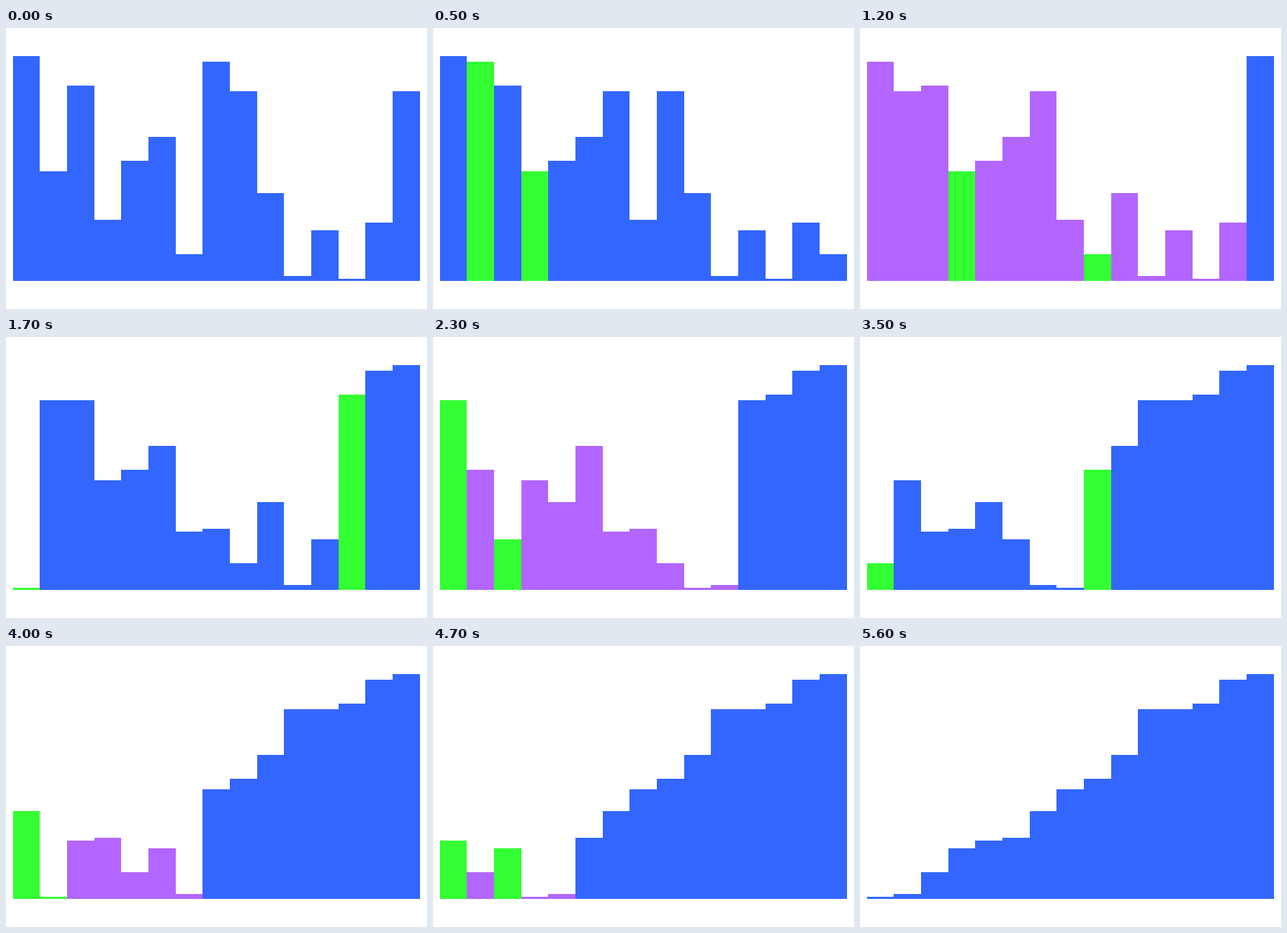
An HTML page with a canvas for the animation above (5700 ms loop, 600 by 400 pixels).

```html
<!DOCTYPE html>
<html lang="en">
<head>
<meta charset="utf-8">
<title>Heapsort</title>
<style>
  html, body { margin: 0; width: 100%; height: 100%; overflow: hidden; background: #fff; }
  canvas { display: block; }
</style>
</head>
<body>
<canvas width="600" height="400"></canvas>
<script>
const BLUE = '#3366ff', GREEN = '#33ff33', PURPLE = '#b266ff';
const STEP = 100;
const bars = [320, 156, 278, 87, 171, 205, 38, 312, 270, 125, 7, 72, 3, 83, 270];
const count = bars.length;
const steps = [];

// Keep a picture of the bars: the first `heap` are purple, `marked` are green.
function record(heap = 0, marked = []) {
  steps.push({ bars: [...bars], heap, marked });
}

function swap(a, b, heap) {
  [bars[a], bars[b]] = [bars[b], bars[a]];
  record(heap, [a, b]);
}

// Returns the place where the sinking bar comes to rest.
function sink(i, size, heap) {
  for (;;) {
    let child = 2 * i + 1;
    if (child >= size) return i;
    if (child + 1 < size && bars[child + 1] > bars[child]) child++;
    if (bars[child] <= bars[i]) return i;
    swap(i, child, heap);
    i = child;
  }
}

function heapsort() {
  record();
  for (let i = (count >> 1) - 1; i >= 0; i--) {
    sink(i, count, 0);
    if (steps.at(-1).marked.length) record();
  }
  record(count);
  for (let size = count - 1; size > 0; size--) {
    swap(0, size, 0);
    const rest = sink(0, size, size);
    // No pause when the next child slot is the freshly sorted, larger bar.
    if (2 * rest + 1 !== size || bars[size] === bars[0]) record(size);
  }
  record();
}

const ctx = document.querySelector('canvas').getContext('2d');
const edge = i => 10 + Math.floor(i * 580 / count);

function draw({ bars, heap, marked }) {
  ctx.fillStyle = '#fff';
  ctx.fillRect(0, 0, 600, 400);
  bars.forEach((height, i) => {
    ctx.fillStyle = marked.includes(i) ? GREEN : i < heap ? PURPLE : BLUE;
    ctx.fillRect(edge(i), 360 - height, edge(i + 1) - edge(i), height);
  });
}

heapsort();
const start = performance.now();

function tick() {
  const time = performance.now() - start;
  draw(steps[Math.floor(time / STEP) % steps.length]);
  requestAnimationFrame(tick);
}
tick();
</script>
</body>
</html>
```
